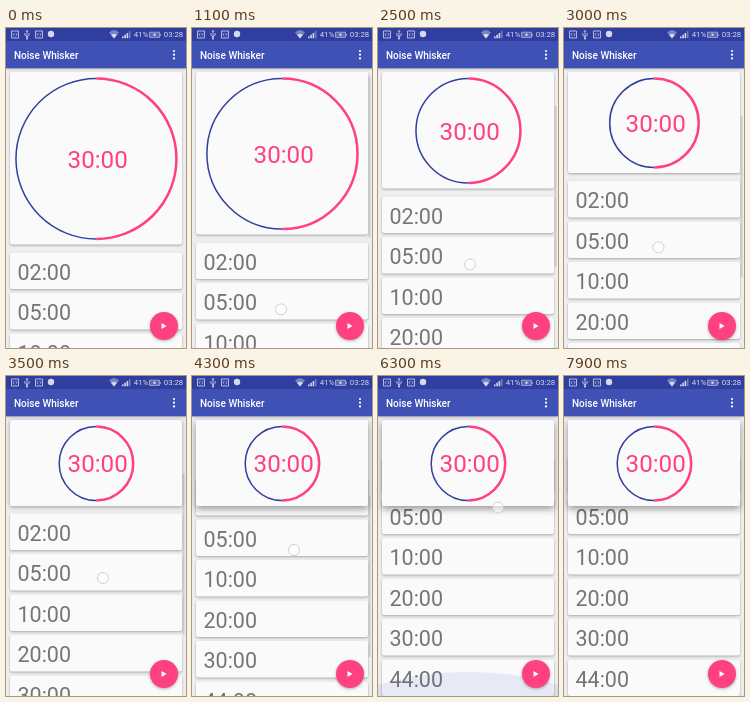
These frames come from a looping animation (180x320 px, 8000 ms). An HTML page:

```html
<!DOCTYPE html>
<html lang="en">
<head>
<meta charset="utf-8">
<style>
  html, body { margin: 0; width: 100%; height: 100%; overflow: hidden; background: #eee; }
  svg { display: block; width: 100vw; height: 100vh; font-family: Roboto, "Noto Sans", sans-serif; }
  .card { fill: #fafafa; }
  #rows .card { filter: drop-shadow(0 1px 1px rgba(0, 0, 0, .3)); }
  #rows text { font-size: 21.5px; fill: #757575; }
  .status { font-size: 7.8px; fill: #d5d9ee; }
  .line { fill: none; stroke: #d5d9ee; stroke-width: .8; }
  #fab { filter: drop-shadow(0 1.5px 1.5px rgba(0, 0, 0, .3)); }
</style>
</head>
<body>
<svg viewBox="0 0 180 320">
  <rect width="180" height="320" fill="#eee"/>
  <g id="rows"></g>

  <rect id="panel" class="card" x="4" y="44" width="172" rx="2"/>
  <path id="rest" fill="none" stroke="#303f9f" stroke-width="1.5"/>
  <path id="done" fill="none" stroke="#ff4081" stroke-width="2.5"/>
  <text id="clock" x="91.7" text-anchor="middle" font-size="24.2" fill="#ff4081">30:00</text>

  <ellipse id="glow" cx="90" cy="348" rx="135" fill="#3f51b5" opacity=".1"/>
  <rect id="bar" x="176.5" width="2" height="161" fill="#999"/>

  <g style="filter: drop-shadow(0 1px 1px rgba(0, 0, 0, .2))">
    <rect width="180" height="40.3" fill="#3f51b5"/>
  </g>
  <rect width="180" height="13" fill="#303f9f"/>
  <text x="8" y="30.5" font-size="10" font-weight="500" fill="#fff">Noise Whisker</text>
  <g fill="#fff">
    <circle cx="168" cy="23" r="1.1"/><circle cx="168" cy="26.7" r="1.1"/><circle cx="168" cy="30.4" r="1.1"/>
  </g>

  <g class="line">
    <path id="code" d="M5.5 3h7v7h-7zM8.3 5.1L6.9 6.5l1.4 1.4M9.7 5.1l1.4 1.4-1.4 1.4"/>
    <use href="#code" x="24"/>
    <path d="M21 2.5v8.5M18.8 5v2.2l2.2 1.6 2.2-1.6V5M20 3.7l1-1.4 1 1.4"/>
    <path d="M143.5 4.2h10v5.2h-10zM154.5 6v1.8" fill="#5c68b5" stroke="#aeb5dc"/>
  </g>
  <g fill="#d5d9ee">
    <circle cx="21" cy="10.6" r="1"/>
    <circle cx="148.5" cy="6.8" r="1.2"/>
    <circle cx="45" cy="6" r="3.2"/>
    <path d="M103 4.5Q108 -.5 113 4.5L108 10.5z" opacity=".45"/>
    <path d="M105.2 7Q108 4.5 110.8 7L108 10.5z"/>
    <path d="M116 10.2V8.4h1.6v1.8zM118.3 10.2V6.8h1.6v3.4zM120.6 10.2V5h1.6v5.2z"/>
    <path d="M122.9 10.2V3h1.6v7.2z" opacity=".4"/>
  </g>
  <text class="status" x="127.7" y="9.4">41%</text>
  <text class="status" x="157.8" y="9.4">03:28</text>

  <circle id="touch" r="5.5" fill="#fff" fill-opacity=".55" stroke="#c3c5d2" stroke-width=".8"/>
  <g id="fab">
    <circle cx="158" cy="298" r="14" fill="#ff4081"/>
    <path d="M155.5 295v6l5-3z" fill="#fff"/>
  </g>
</svg>
<script>
const LOOP = 8000, STEP = 100, PITCH = 40.5;
const $ = id => document.getElementById(id);
const set = (id, attrs) => Object.entries(attrs).forEach(([k, v]) => $(id).setAttribute(k, v));

$('rows').innerHTML = ['02', '05', '10', '20', '30', '44'].map((m, i) =>
  `<g transform="translate(0 ${i * PITCH})">
    <rect class="card" x="4" y="224.5" width="172" height="36.5" rx="2"/>
    <text x="11.5" y="251.6">${m}:00</text></g>`).join('');

// Linear interpolation through [time, value] points
function track(points, t) {
  if (t <= points[0][0]) return points[0][1];
  for (let i = 1; i < points.length; i++) {
    const [a, from] = points[i - 1], [b, to] = points[i];
    if (t <= b) return from + (to - from) * (t - a) / (b - a);
  }
  return points[points.length - 1][1];
}

const scroll = [[800, 0], [1800, 33], [2500, 56], [3500, 87], [4300, 121.5], [5000, 143.5]];
const touchX = [[600, 88], [1800, 90.3], [2500, 92], [3500, 97], [4300, 102], [6300, 120]];
const touchY = [[600, 294], [800, 291], [1800, 259], [2500, 236.5], [3500, 202], [4300, 174], [6300, 131.5]];
const glowSize = [[5000, 0], [6300, 52], [6500, 50], [7200, 0]];
const barFade = [[800, 0], [900, .4], [5300, .4], [5800, 0]];

function draw(t) {
  const s = track(scroll, t);
  const bottom = Math.max(130, 216.5 - s);
  const mid = (44 + bottom) / 2 + .5, r = (bottom - 44) / 2 - 6;
  const lift = Math.min(1, Math.max(0, (s - 70) / 40));
  const half = sweep => `M90.2 ${mid - r}A${r} ${r} 0 0 ${sweep} 90.2 ${mid + r}`;

  set('rows', { transform: `translate(0 ${-s})` });
  set('panel', { height: bottom - 44 });
  $('panel').style.filter =
    `drop-shadow(0 ${1 + 2 * lift}px ${1 + 2.5 * lift}px rgba(0, 0, 0, ${.3 + .1 * lift}))`;
  set('rest', { d: half(0) });
  set('done', { d: half(1) });
  set('clock', { y: mid + 8.8 });
  set('bar', { y: 42 + s * .64, opacity: track(barFade, t) });
  set('glow', { ry: track(glowSize, t) });
  set('touch', {
    cx: track(touchX, t), cy: track(touchY, t),
    opacity: t >= 600 && t <= 6400 ? 1 : 0
  });
}

function tick() {
  draw(Math.floor(performance.now() % LOOP / STEP) * STEP);
  requestAnimationFrame(tick);
}
tick();
</script>
</body>
</html>
```
